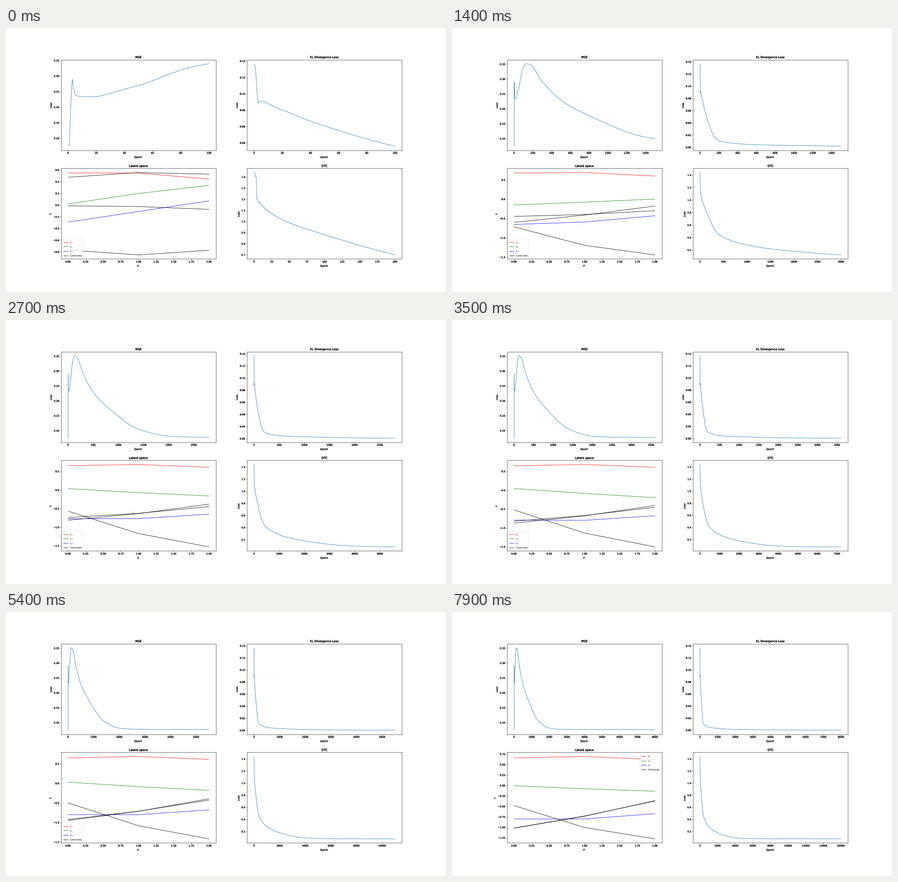
These frames come from a looping animation (966 px wide and 580 px high, 8 s). A matplotlib script:

```python
import numpy as np
import matplotlib.pyplot as plt
from matplotlib import patheffects as pe
from matplotlib.animation import FuncAnimation
from matplotlib.lines import Line2D
from matplotlib.patches import FancyBboxPatch
from matplotlib.transforms import Affine2D

W, H, DPI = 966, 580, 38.64
FRAMES, INTERVAL, STEP = 80, 100, 100

# (epoch, loss) key points, joined smoothly over log(epoch)
MSE = [(0, .0748), (1, .0803), (3, .29), (5, .238), (18, .2335), (50, .2696),
       (100, .3395), (130, .3513), (180, .347), (300, .292), (500, .2295),
       (900, .1627), (1400, .1052), (2100, .0802), (2800, .0776), (8000, .0761)]
KL = [(0, .1367), (1, .1325), (3, .0883), (5, .0914), (20, .0803), (50, .0607),
      (100, .036), (150, .0176), (200, .0109), (300, .0078), (600, .0042),
      (1000, .0032), (2100, .0011), (8000, .0001)]
DTC = [(0, 1.44), (1, 1.4), (2, 1.2), (5, 1.15), (25, .987), (50, .88),
       (100, .7), (150, .542), (200, .449), (300, .37), (500, .281),
       (1000, .18), (2100, .0916), (3000, .0805), (8000, .077)]

# latent lines: left end, right end at the key steps, then bend at start and rest
KEYS = [0, 8, 20, 35, 79]
LINES = [
    ("red", [.55, .683, .667, .65, .661], [.446, .569, .611, .611, .62], (.05, .053)),
    ("green", [.021, -.299, .015, .047, -.003], [.3375, .13, -.089, -.197, -.136], (.02, -.01)),
    ("blue", [-.29, -.529, -.731, -.793, -.801], [.072, -.205, -.583, -.678, -.674], (0, -.063)),
    ("black", [.476, -.374, -.725, -.871, -1.02], [.529, .066, -.32, -.404, -.362], (.055, -.044)),
    ("black", [-.012, -.23, -.626, -.821, -1.016], [-.072, -.136, -.431, -.451, -.37], (.018, -.036)),
    ("black", [-.768, -.771, -.63, -.521, -.481], [-.772, -1.232, -1.538, -1.503, -1.276], (-.08, -.125)),
]


def smooth(xs, ys, x):
    """Monotone cubic interpolation."""
    xs, ys = np.asarray(xs, float), np.asarray(ys, float)
    h = np.diff(xs)
    d = np.diff(ys) / h
    m = np.zeros(len(xs))
    m[0], m[-1] = d[0], d[-1]
    for k in range(1, len(d)):
        if d[k - 1] * d[k] > 0:
            a, b = 2 * h[k] + h[k - 1], h[k] + 2 * h[k - 1]
            m[k] = (a + b) / (a / d[k - 1] + b / d[k])
    i = np.clip(np.searchsorted(xs, x, "right") - 1, 0, len(h) - 1)
    t = (x - xs[i]) / h[i]
    return ((1 + 2 * t) * (1 - t) ** 2 * ys[i] + t * (1 - t) ** 2 * h[i] * m[i]
            + t * t * (3 - 2 * t) * ys[i + 1] + t * t * (t - 1) * h[i] * m[i + 1])


def loss_curve(points):
    xs, ys = zip(*points)
    return smooth(np.log1p(xs), ys, np.log1p(np.arange(FRAMES * STEP + 1)))


def line_motion(left, right, bend):
    n = np.arange(FRAMES)
    a, b = smooth(KEYS, left, n), smooth(KEYS, right, n)
    bow = bend[1] + (bend[0] - bend[1]) * np.exp(-n / 9)
    return np.array([a, (a + b) / 2 + bow, b])


def heavy(dx, dy):
    return [pe.Stroke(offset=(-dx, -dy)), pe.Stroke(offset=(dx, dy)), pe.Normal()]


FLAT, UPRIGHT = heavy(.5, 0), heavy(0, .5)

fig, axes = plt.subplots(2, 2, figsize=((W + .01) / DPI, (H + .01) / DPI), dpi=DPI)
fig.subplots_adjust(left=.125, right=.9, bottom=.125, top=.88, wspace=.2, hspace=.2)
ax_mse, ax_kl, ax_lat, ax_dtc = axes.flat


def label(ax, title, x="Epoch", y="Loss"):
    ax.set_title(title, fontsize=12, path_effects=FLAT)
    ax.set_xlabel(f"${x}$", path_effects=FLAT)
    ax.set_ylabel(f"${y}$", path_effects=UPRIGHT)
    ax.tick_params(width=1.1)
    for spine in ax.spines.values():
        spine.set_linewidth(1.1)


label(ax_mse, "MSE")
label(ax_kl, "KL Divergence Loss")
label(ax_lat, "Latent space", "X", "Y")
label(ax_dtc, "DTC")

# the DTC loss is logged twice per epoch
curves = [(ax.plot([], [], color="C0")[0], np.repeat(loss_curve(points), rate), rate)
          for ax, points, rate in ((ax_mse, MSE, 1), (ax_kl, KL, 1), (ax_dtc, DTC, 2))]
paths = [(ax_lat.plot([0, 1, 2], [0, 0, 0], color=color)[0], line_motion(*motion))
         for color, *motion in LINES]

# legend in pixels, moved as a whole
BOX_W, BOX_H, ROW = 45.5, 39.7, 9.85
legend_at = Affine2D()
ax_lat.add_artist(FancyBboxPatch(
    (0, 0), BOX_W, BOX_H, boxstyle="round,pad=0,rounding_size=1.07", fc="white",
    ec="0.8", lw=1, alpha=.8, zorder=5, transform=legend_at, clip_on=False))
entries = zip(("red", "green", "blue", "black"), ("$L_1$", "$L_2$", "$L_3$", "Centroids"))
for row, (color, name) in enumerate(entries):
    y = 34.2 - ROW * row
    ax_lat.add_artist(Line2D([2.2, 12.9], [y, y], color=color, zorder=6,
                             transform=legend_at, clip_on=False))
    ax_lat.text(17.2, y - 1.9, name, fontsize=10, va="baseline", zorder=6,
                transform=legend_at, path_effects=[pe.Normal()])


def legend_spot(n):
    """The legend leaves the lower left, then the centre, as lines run into it."""
    if n < 62:
        return 123.4, 75.2
    if n < 76:
        return 291 - BOX_W / 2, 172 - BOX_H / 2
    return 458.6 - BOX_W, 268.8 - BOX_H


def update(n):
    for line, data, rate in curves:
        count = rate * STEP * (n + 1) + 1
        line.set_data(np.arange(count), data[:count])
    for line, values in paths:
        line.set_ydata(values[:, n])
    legend_at.clear().translate(*legend_spot(n))
    for ax in axes.flat:
        ax.relim()
        ax.autoscale_view()
        for text in ax.get_xticklabels() + ax.get_yticklabels():
            text.set_path_effects(FLAT)
    return []


anim = FuncAnimation(fig, update, frames=FRAMES, interval=INTERVAL,
                     repeat=True, repeat_delay=0, blit=False)
plt.show()
```
